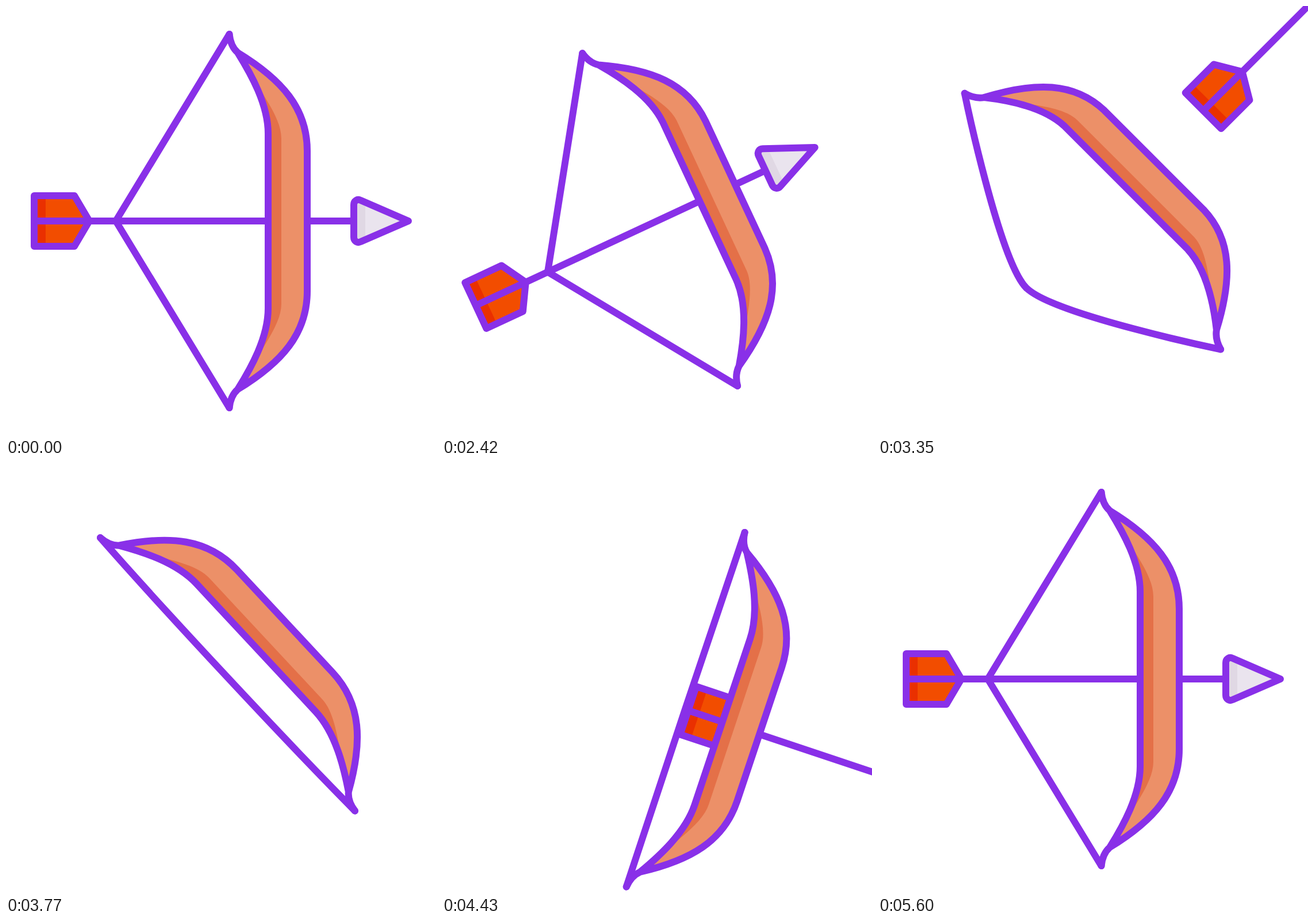
An HTML page that plays this animation: 748x748 px, repeating every 5630 ms.

```html
<!DOCTYPE html>
<html lang="en">
<head>
<meta charset="utf-8">
<title>Bow and arrow</title>
<style>
  html, body { margin: 0; width: 100%; height: 100%; overflow: hidden; background: #fff; }
  svg { display: block; width: 100vw; height: 100vh; }
  .line { fill: none; stroke: #8930e8; stroke-width: 12; stroke-linecap: round; stroke-linejoin: round; }
  .wood { fill: #ec9068; fill-rule: evenodd; }
  .shade { fill: #e47048; fill-rule: evenodd; }
</style>
</head>
<body>
<svg viewBox="0 0 748 748">
  <defs>
    <path id="head" d="M605 346C605 339 611 335 617 338L700 374L617 410C611 413 605 409 605 402Z"/>
    <clipPath id="base"><path d="M600 330H625V420H600Z"/></clipPath>
  </defs>
  <g id="scene">
    <g id="arrow">
      <path fill="#f24d00" d="M49 330H119L145 374L119 418H49Z"/>
      <path fill="#ea3000" d="M49 330H69V418H49Z"/>
      <path class="line" d="M49 330H119L145 374L119 418H49ZM49 374H605"/>
      <use href="#head" fill="#eae4ee"/>
      <use href="#head" fill="#e0d8e4" clip-path="url(#base)"/>
      <use href="#head" class="line"/>
    </g>
    <path id="string" class="line"/>
    <path id="wood" class="wood"/>
    <path id="shade" class="shade"/>
    <path id="outline" class="line"/>
  </g>
</svg>
<script>
const LOOP = 5630, HOLD = 2000, STEP = 30, STEPS = 120, MID = 374;
const el = id => document.getElementById(id);
const [scene, arrow, string, wood, shade, outline] =
  ['scene', 'arrow', 'string', 'wood', 'shade', 'outline'].map(el);

// Upper halves of the bow, one cubic each; the lower halves mirror them.
const TIP = [388.5, 49], JOIN = [403, 81];
const NECK = [TIP, [390, 64], [395, 74], JOIN];
const BACK = [JOIN, [480, 128], [524, 178], [524, 252]];
const BELLY = [JOIN, [426, 118], [456, 171], [456, 222]];
const EDGE = [JOIN, [436, 142], [479, 190], [479, 230]];

// Eased progress from step a to step b; x1 and x2 shape the start and the end.
function phase(n, a, b, x1 = 1 / 3, x2 = 2 / 3) {
  const s = Math.min(1, Math.max(0, (n - a) / (b - a)));
  let lo = 0, hi = 1;
  for (let i = 0; i < 30; i++) {
    const u = (lo + hi) / 2, v = 1 - u;
    if (3 * x1 * u * v * v + 3 * x2 * u * u * v + u * u * u < s) lo = u; else hi = u;
  }
  return hi * hi * (3 - 2 * hi);
}

// Drawing the string pulls the limbs back and inwards, most at the tips.
function bent([x, y], bend) {
  const k = bend * Math.max(0, (MID - y - 120) / 205) ** 2;
  return [x - 23 * k, y + 15 * k];
}

const flip = ([x, y]) => [x, 2 * MID - y];
const cubic = ([a, ...rest]) => `M${a}C${rest.join(' ')}`;

function limb(half, bend) {
  const up = half.map(p => bent(p, bend));
  const [a, ...rest] = up.map(flip).reverse();
  return `${cubic(up)}L${a}C${rest.join(' ')}`;
}

function draw(n) {
  const aim = phase(n, 0, 40, .333, .2);
  const pull = phase(n, 0, 40, .167);
  const fly = phase(n, 40, 48);
  const loose = phase(n, 40, 62, .2, .3);
  const swing = phase(n, 54, 80, .67);
  const land = phase(n, 70, 119, .25, 0);
  const settle = phase(n, 80, STEPS, .333, .64);
  const redraw = phase(n, 80, STEPS, .333, .367);

  const shift = swing - settle, bend = pull - loose;
  const turn = 45 * (swing - aim) + 18.5 * shift;
  const flight = n < 60 ? 960 * fly - 60 * pull : 710 * (1 - land);
  scene.setAttribute('transform',
    `translate(${MID + 36 * shift} ${MID + 48.7 * shift}) rotate(${turn}) translate(${-MID} ${-MID})`);
  arrow.setAttribute('transform', `translate(${flight} 0)`);
  arrow.style.display = n > 48 && n < 77 ? 'none' : '';

  const belly = limb(BELLY, bend);
  const back = limb(BACK, bend);
  const neck = cubic(NECK.map(p => bent(p, bend)));
  const foot = cubic(NECK.map(p => flip(bent(p, bend))));
  wood.setAttribute('d', `${back}Z${belly}Z`);
  shade.setAttribute('d', `${limb(EDGE, bend)}Z${belly}Z`);
  outline.setAttribute('d', neck + back + belly + foot);

  const tip = bent(TIP, bend), end = flip(tip);
  const nock = 191 - 70 * pull + 267 * loose - 197 * redraw;
  const soft = 200 * (loose - redraw);
  string.setAttribute('d',
    `M${tip}C${tip} ${nock} ${MID - soft} ${nock} ${MID}C${nock} ${MID + soft} ${end} ${end}`);
}

const start = performance.now();
function tick() {
  const t = (performance.now() - start) % LOOP;
  draw(Math.min(STEPS, Math.max(0, Math.floor((t - HOLD) / STEP))));
  requestAnimationFrame(tick);
}
tick();
</script>
</body>
</html>
```
